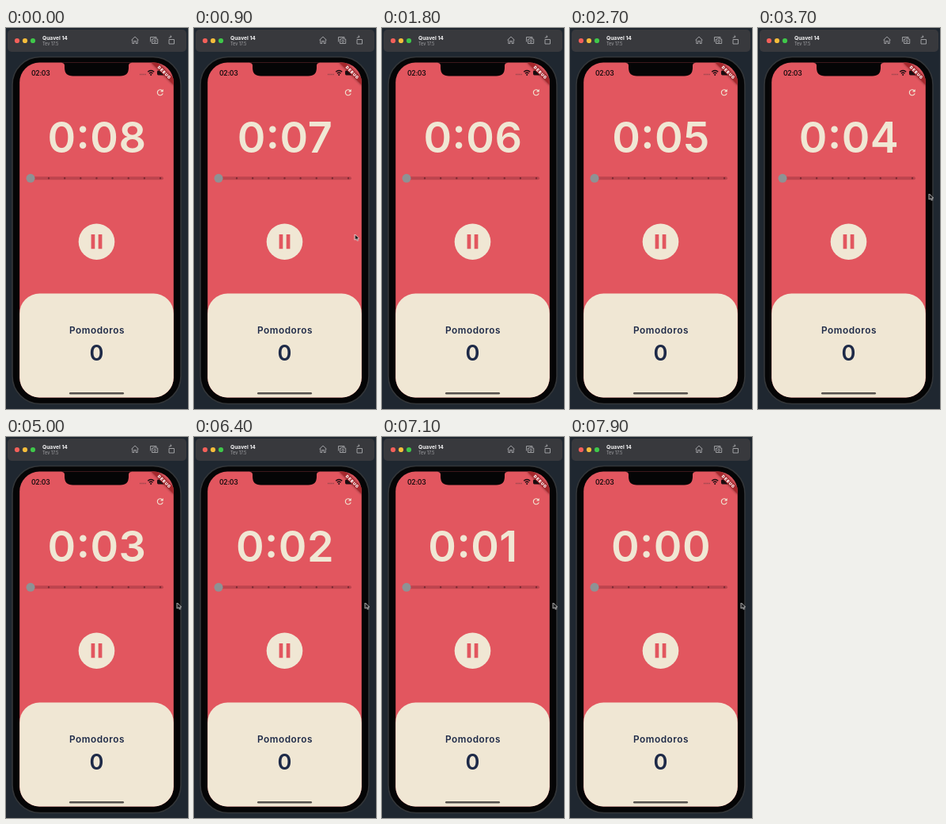
Write an HTML page that moves like this. It is 230 px wide and 480 px high and loops after 8 s.

```html
<!DOCTYPE html>
<html lang="en">
<head>
<meta charset="utf-8">
<title>Pomodoro timer</title>
<style>
  html, body { margin: 0; width: 100%; height: 100%; overflow: hidden; background: #1f2730; }
  svg { display: block; width: 230px; height: 480px; font-family: Inter, Roboto, sans-serif; font-weight: 600; }
  .red { fill: #e2565f; }
  .cream { fill: #f0e7d4; }
  .navy { fill: #1e2a48; }
  .mid { text-anchor: middle; }
  .line { fill: none; stroke: #a9aaad; stroke-width: .9; stroke-linejoin: round; }
  .ribbon { fill: #a5272c; filter: drop-shadow(0 0 1.5px rgba(0, 0, 0, .5)); }
  #cursor { animation: wander 8s infinite; }
  @keyframes wander {
    0%, 7.5% { transform: translate(234px, 290px); animation-timing-function: ease-out; }
    11%, 13% { transform: translate(203.5px, 260px); animation-timing-function: ease-in; }
    19%, 37% { transform: translate(234px, 232px); animation-timing-function: ease-out; }
    42%, 100% { transform: translate(216.5px, 209px); }
  }
</style>
</head>
<body>
<svg viewBox="0 0 230 480">
  <defs>
    <clipPath id="screen"><rect x="17.2" y="43.6" width="194.600" height="421.800" rx="25"/></clipPath>
  </defs>

  <!-- Window bar -->
  <rect x="2" y="2" width="226" height="28" rx="5" fill="#38393d"/>
  <circle cx="14" cy="16" r="3.1" fill="#f4605a"/>
  <circle cx="24" cy="16" r="3.1" fill="#f6bd3b"/>
  <circle cx="34" cy="16" r="3.1" fill="#3fc84a"/>
  <text x="46" y="15" font-size="6.7" font-weight="700" fill="#f2f2f3">Quavel 14</text>
  <text x="46" y="22.3" font-size="5.5" font-weight="400" fill="#a2a3a6">Tev 17.5</text>
  <g class="line">
    <path d="M158.5 15.2 163 11l4.5 4.2M159.8 14.5V19.5h2V16.5h2.4v3h2V14.5"/>
    <path d="M182.5 17.5V11.5h7.5v1.5M184.5 14h1.8l.7-1h2.2l.7 1h1.8v5.5h-7.2z"/>
    <circle cx="188.1" cy="16.6" r="1.4"/>
    <path d="M206 14.5h6.5v5.5H206zM206 12.8q.5-2 3-2M207.7 9.4l1.5 1.4-1.5 1.4"/>
  </g>

  <!-- Phone body -->
  <rect x="8" y="36.5" width="213" height="437" rx="35" fill="#050506" stroke="#333639" stroke-width="1.6"/>

  <g clip-path="url(#screen)">
    <rect class="red" x="17" y="43" width="195" height="423"/>
    <rect class="cream" x="17" y="334.5" width="195" height="160" rx="25.500"/>
    <path d="M70.500 43H158.500V44q-3.500 0-3.500 3.500v2.500q0 10.500-10.500 10.500h-60Q74 60.500 74 50v-2.500q0-3.500-3.500-3.500z" fill="#050506"/>

    <!-- Status bar -->
    <text x="32" y="60.3" font-size="8.6" letter-spacing="-.3" fill="#1b0d10">02:03</text>
    <path d="M169 58.5h8" stroke="#93434a" stroke-width="1.3" stroke-dasharray="1.3 .9"/>
    <path d="M179.2 55.3q4-3.6 8 0M180.9 57.2q2.3-2 4.6 0" fill="none" stroke="#1b0d10" stroke-width="1.4"/>
    <circle cx="183.2" cy="58.9" r="1" fill="#1b0d10"/>
    <rect x="191" y="53.6" width="10.5" height="5.8" rx="1.6" fill="#1b0d10"/>

    <!-- Corner ribbon -->
    <g transform="translate(200 55.800) rotate(45)">
      <rect class="ribbon" x="-20" y="-3" width="40" height="6"/>
      <text class="mid" x=".4" y="1.9" font-size="5.1" font-weight="900" letter-spacing=".8" fill="#fff">DEBUG</text>
    </g>
  </g>

  <!-- Reset -->
  <path d="M197.4 78.9A3.5 3.5 0 1 0 198.2 82.3" fill="none" stroke="#f0e7d4" stroke-width="1.1"/>
  <path class="cream" d="M198.7 76.9v3.7H195z"/>

  <text class="cream mid" x="115" y="157" font-size="54" letter-spacing=".5">0<tspan dy="-5">:</tspan><tspan id="seconds" dy="5">08</tspan></text>

  <!-- Slider -->
  <path d="M31 189.3H197" stroke="#bd444e" stroke-width="4" stroke-linecap="round"/>
  <path d="M54 189.3H196" stroke="#7d2a33" stroke-width="2.4" stroke-linecap="round" stroke-dasharray="0 20.15"/>
  <circle cx="31" cy="189.3" r="5.5" fill="#8e9294"/>

  <!-- Pause button -->
  <circle class="cream" cx="114.5" cy="269.2" r="22.800"/>
  <path class="red" d="M107.6 260h4.7v18.3h-4.7zM116.7 260h4.7v18.3H116.700z"/>

  <text class="navy mid" x="115" y="385" font-size="11.8" letter-spacing=".55">Pomodoros</text>
  <text class="navy mid" x="114.5" y="419.2" font-size="27.2">0</text>
  <rect x="80" y="459" width="69" height="2.6" rx="1.3" fill="#55504c"/>

  <path id="cursor" d="M0 0V7.2L1.7 5.7 2.8 8.2 4.1 7.6 3 5.2H5.2z" fill="#08080a" stroke="#fff" stroke-width=".7" stroke-linejoin="round"/>
</svg>
<script>
  const LOOP = 8000, FIRST_TICK = 600, START = 8;
  const seconds = document.getElementById('seconds');
  const origin = performance.now();

  function draw() {
    const t = (performance.now() - origin) % LOOP;
    const ticks = Math.floor((t - FIRST_TICK) / 1000) + 1;
    const text = '0' + (START - ticks);
    if (seconds.textContent !== text) seconds.textContent = text;
    requestAnimationFrame(draw);
  }
  draw();
</script>
</body>
</html>
```
